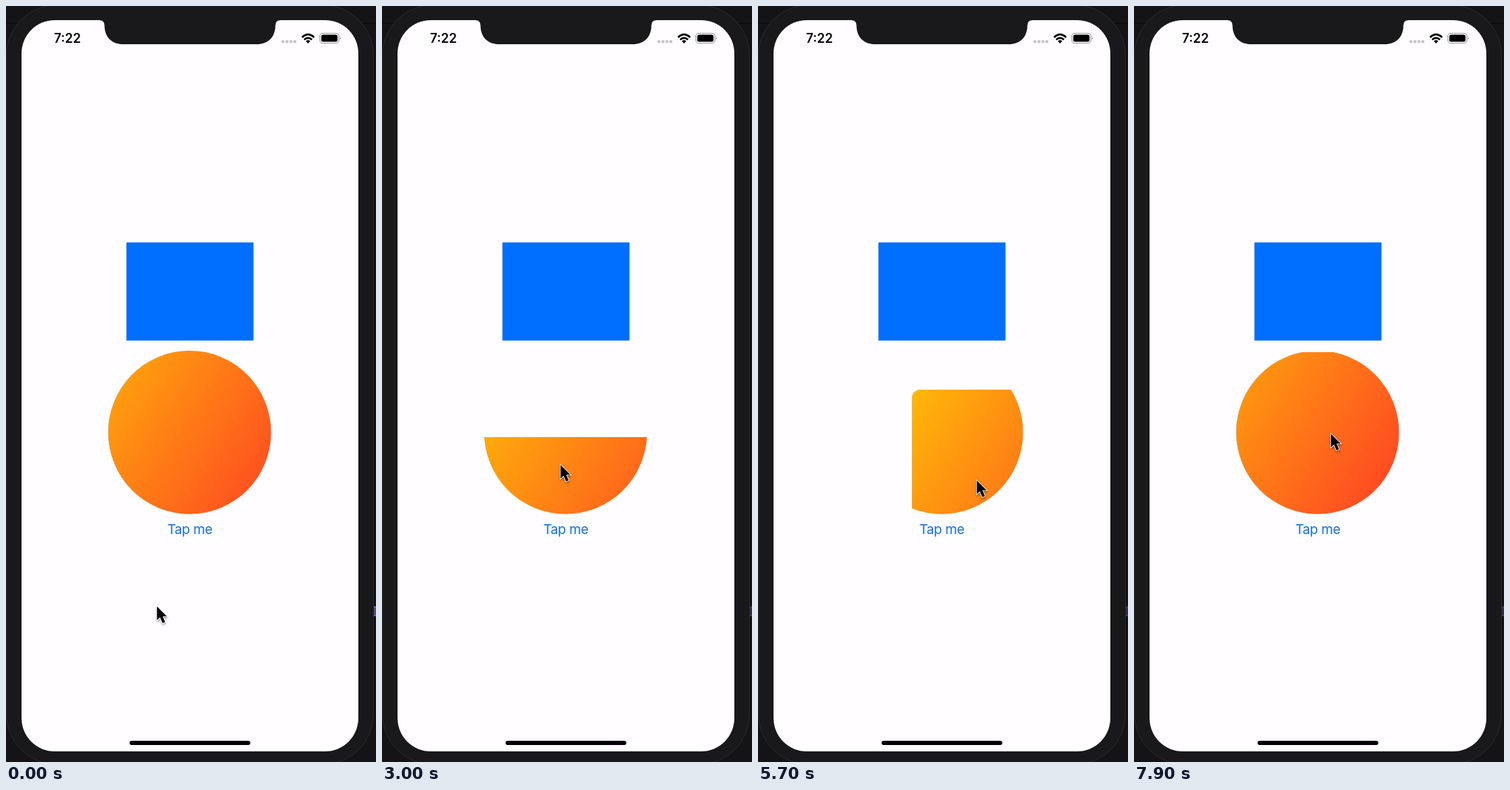
Animation, 524 px wide and 1068 px high, one loop 8 s. Source, as an HTML page:

```html
<!DOCTYPE html>
<html lang="en">
<head>
<meta charset="utf-8">
<title>Draggable card in a circle</title>
<style>
  html, body { margin: 0; width: 100%; height: 100%; overflow: hidden; background: #19181a; }
  svg { display: block; width: 524px; height: 1068px; }
  text { font-family: Inter, Roboto, sans-serif; }
</style>
</head>
<body>
<svg viewBox="0 0 524 1068">
  <defs>
    <linearGradient id="warm" gradientUnits="userSpaceOnUse" x1="0" y1="0" x2="346" y2="231">
      <stop offset="0" stop-color="#ffb808"/>
      <stop offset="1" stop-color="#ff3726"/>
    </linearGradient>
    <clipPath id="disc"><circle cx="260" cy="602.3" r="115.4"/></clipPath>
    <filter id="shadow" x="-50%" y="-30%" width="220%" height="180%">
      <feDropShadow dx="0.5" dy="2" stdDeviation="1.4" flood-color="#000" flood-opacity=".4"/>
    </filter>
  </defs>

  <!-- phone body -->
  <rect width="524" height="1068" fill="#141417"/>
  <path d="M0 24.5H18M505 24.5H524" stroke="#09090b"/>
  <rect x="0.5" y="-1.5" width="520" height="1073" rx="72" fill="#19181a" stroke="#2b2a2d"/>
  <path d="M521.5 70V1000" stroke="#09090b"/>
  <path id="sliver" d="M521 849H524M522.5 849V861M521 861H524" stroke="#7460b8" stroke-width="2" fill="none"/>

  <!-- screen, notch and home bar -->
  <rect x="22" y="20" width="477" height="1033" rx="47" fill="#fffdff"/>
  <path d="M132 19V20Q139.500 20 139.500 27.500C139.500 44 150 54 166 54H355C371 54 381.500 44 381.500 27.500Q381.500 20 389 20V19Z" fill="#19181a"/>
  <rect x="175" y="1038" width="171" height="6" rx="3" fill="#000"/>

  <!-- status bar -->
  <text x="68" y="52" font-size="18" font-weight="600" fill="#000">7:22</text>
  <g fill="#c6c4c8">
    <circle cx="392.200" cy="50.300" r="2.200"/><circle cx="397.800" cy="50.300" r="2.200"/>
    <circle cx="403.400" cy="50.300" r="2.200"/><circle cx="409" cy="50.300" r="2.200"/>
  </g>
  <g fill="none" stroke="#000" stroke-width="2.700">
    <path d="M419.200 44.300Q427.800 36 436.400 44.300"/>
    <path d="M422.300 47.600Q427.800 42.500 433.300 47.600"/>
    <path d="M424.600 49.600Q427.800 46.800 431 49.600L427.800 53Z" fill="#000" stroke="none"/>
  </g>
  <rect x="444.500" y="38.500" width="27" height="14" rx="4" fill="none" stroke="#9c9a9e" stroke-width="1.100"/>
  <rect x="446.500" y="40.500" width="23" height="10" rx="2.300" fill="#000"/>
  <path d="M473 43.200Q475.400 45.500 473 47.800Z" fill="#9c9a9e"/>

  <!-- content -->
  <rect x="170.500" y="334" width="180" height="138.600" fill="#006eff"/>
  <g clip-path="url(#disc)">
    <rect id="card" width="346" height="231" rx="11.500" fill="url(#warm)"/>
  </g>
  <text x="260.300" y="746" font-size="19" letter-spacing="-.4" text-anchor="middle" fill="#0f6fe8">Tap me</text>

  <path id="cursor" filter="url(#shadow)" d="M0.800 1.200V20.600L5.200 16.500L8.700 24.700L12.300 23.200L8.900 15.200H14.800Z"
        fill="#000" stroke="#fff" stroke-width="1.500" paint-order="stroke" stroke-linejoin="miter"/>
</svg>
<script>
const LOOP = 8000, STEP = 100;
const HOME = { x: 87, y: 487 };

// time, pointer x, pointer y, card offset x, card offset y
const path = [
  [0, 213, 847, 0, 0],
  [900, 248, 600, 0, 0],
  [1300, 250, 524, 0, 0],
  [1800, 255, 545, 5, 18],
  [2200, 252, 571, 2, 43],
  [2800, 242, 598, -7, 76],
  [3200, 262, 696, 12, 168],
  [3700, 240, 607, -5, 88],
  [3950, 272, 720, 18, 190],
  [4250, 258, 520, 6, -2],
  [4500, 256, 555, 6, 26],
  [4600, 250, 553, 0, 26],
  [4700, 250, 553, 0, 26],
  [5000, 262, 720, 12, 188],
  [5300, 178, 614, 0, 0],
  [5700, 309, 669, 131, 55],
  [5900, 290, 711, 112, 100],
  [6200, 215, 618, 38, 11],
  [6400, 209, 629, 31, 25],
  [6700, 215, 714, 37, 104],
  [7000, 285, 640, 12, 4],
  [7200, 310, 601, 0, 0],
  [7550, 338, 680, 28, 78],
  [7900, 278, 603, -32, 2],
  [8000, 278, 603, -32, 2]
];

const [card, cursor, sliver] = ["card", "cursor", "sliver"].map(id => document.getElementById(id));
const place = (node, x, y) => node.setAttribute("transform", `translate(${x.toFixed(2)} ${y.toFixed(2)})`);

function pose(t) {
  const i = path.findIndex(k => k[0] > t);
  const a = path[i - 1], b = path[i];
  const u = (t - a[0]) / (b[0] - a[0]);
  const e = u * u * (3 - 2 * u);
  return a.map((v, n) => v + (b[n] - v) * e);
}

function draw(now) {
  const t = Math.floor((now % LOOP) / STEP) * STEP;
  const [, px, py, dx, dy] = pose(t);
  place(cursor, px, py);
  place(card, HOME.x + dx, HOME.y + dy);
  sliver.setAttribute("opacity", 1 - 0.5 * Math.min(t / 1800, 1));
}

const start = performance.now();
function tick() {
  draw(performance.now() - start);
  requestAnimationFrame(tick);
}
tick();
</script>
</body>
</html>
```
